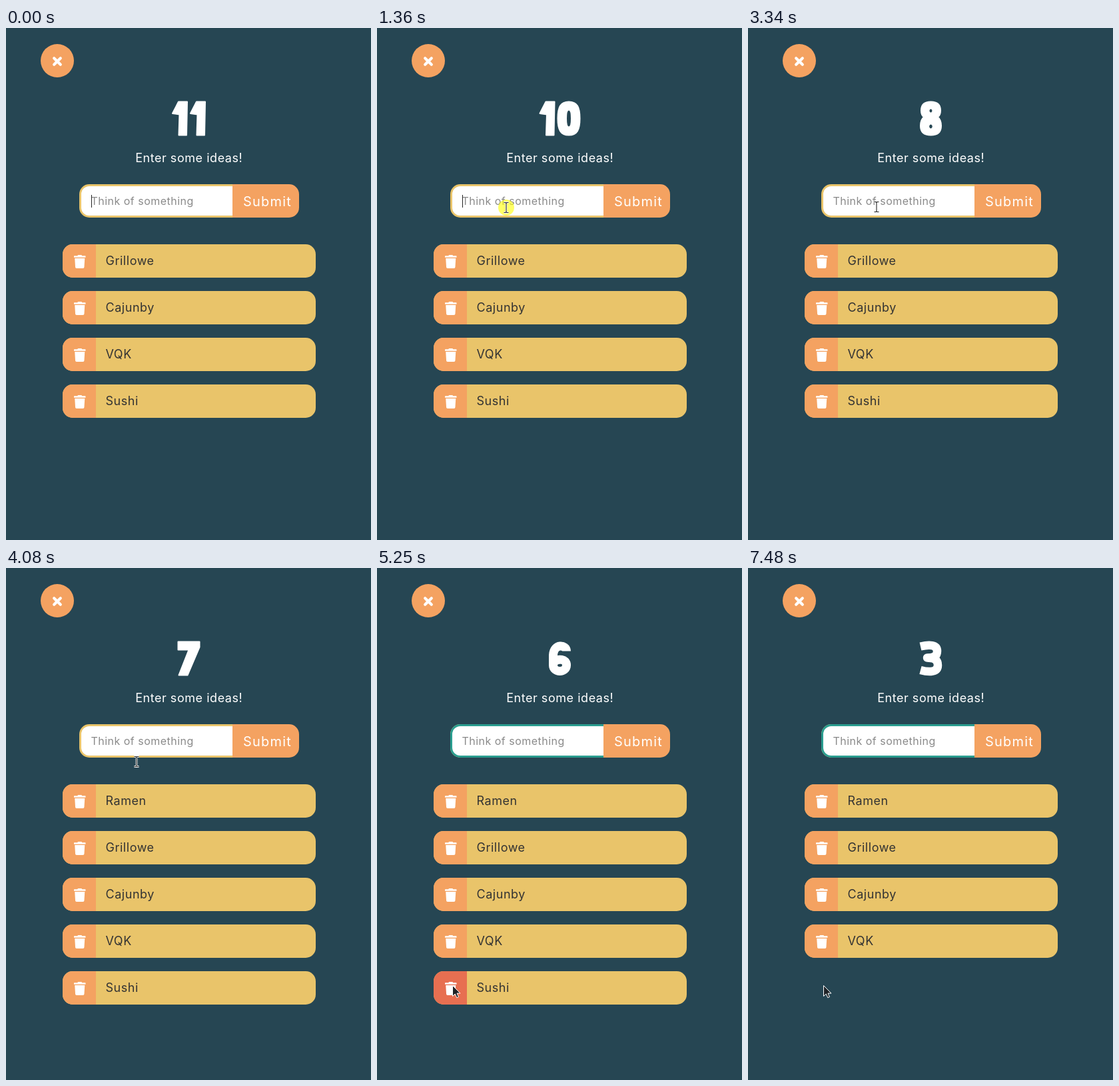
An HTML page that plays this animation: 548x767 px, repeating every 8000 ms.

```html
<!DOCTYPE html>
<html lang="en">
<head>
<meta charset="utf-8">
<title>Idea list</title>
<style>
  html, body { margin: 0; height: 100%; overflow: hidden; background: #264653; }
  svg { display: block; width: 100vw; height: 100vh; }
  text { font: 18px Inter, "Open Sans", sans-serif; letter-spacing: .03em; fill: #fff; }
  .row text { fill: #333; }
  .row rect { fill: #e9c46a; }
  .row .side { fill: #f4a261; }
  .row.hover .side { fill: #e76f51; }
  #field { font-size: 16px; }
  #submit { font-size: 20px; letter-spacing: .06em; }
</style>
</head>
<body>
<svg viewBox="0 0 548 767">
  <defs>
    <path id="frame" d="M340 234H125a15 15 0 0 0-15 15v20a15 15 0 0 0 15 15h215z"/>
    <path id="trash" transform="scale(.0391)" fill="#fff" d="M432 32H312l-9-19A24 24 0 0 0 281 0H167a24 24 0 0 0-22 13l-9 19H16A16 16 0 0 0 0 48v32a16 16 0 0 0 16 16h416a16 16 0 0 0 16-16V48a16 16 0 0 0-16-16zM53 467a48 48 0 0 0 48 45h246a48 48 0 0 0 48-45L416 128H32z"/>
    <path id="bar" fill="none" d="M-3.5-7.5h2.5l1 1 1-1h2.5M0-6.5v13M-3.5 7.5h2.5l1-1 1 1h2.5"/>
  </defs>
  <rect width="548" height="767" fill="#264653"/>
  <circle cx="77" cy="49" r="25" fill="#f4a261"/>
  <path d="M72.2 45.2l9.6 9.6m0-9.6l-9.6 9.6" stroke="#fff" stroke-width="4.2" stroke-linecap="round"/>
  <g id="count" stroke="#fff" stroke-linejoin="round" fill-rule="evenodd"></g>
  <text x="274.7" y="201" text-anchor="middle">Enter some ideas!</text>

  <use href="#frame" fill="#e9c46a"/>
  <use href="#frame" id="blur" fill="#2a9d8f"/>
  <path d="M340 237H125a12 12 0 0 0-12 12v20a12 12 0 0 0 12 12h215z" fill="#fff"/>
  <path d="M340 234h85a15 15 0 0 1 15 15v20a15 15 0 0 1-15 15h-85z" fill="#f4a261"/>
  <text id="field" x="127.5" y="265"></text>
  <rect id="caret" y="250" width="1" height="19" fill="#222"/>
  <text id="submit" x="356" y="267">Submit</text>

  <g id="rows"></g>

  <g id="pointer">
    <circle id="glow" r="12" fill="#ff0" fill-opacity=".6"/>
    <path id="arrow" d="M.5.5v16l3.8-3.4 2.5 5.6 2.7-1.2-2.5-5.4h5z" fill="#1f2327" stroke="#fff"/>
    <g id="beam">
      <use href="#bar" stroke="#fff" stroke-width="2.8"/>
      <use href="#bar" stroke="#222" stroke-width="1.1"/>
    </g>
  </g>
</svg>
<script>
const LOOP = 8000;
const $ = id => document.getElementById(id);
const show = (el, on) => { el.style.display = on ? '' : 'none'; };

// digit: [width, path, stroke width]; wide strokes are left unfilled
const DIGITS = [
  [35, 'M17.5 1C5 1 1 9 1 26s4 25 16.5 25S34 43 34 26 30 1 17.5 1zM17.5 13q4 0 4 13t-4 13-4-13 4-13z', 2],
  [24, 'M10 1H23L22 51H10.5L11.5 20 1 18.5z', 2],
  [],
  [33, 'M1 8C14 5 26 5 26 15c0 8-6 10-15 10 10 0 16 3 16 11 0 11-13 11-26 7.500', 12.5],
  [33, 'M14 1H29.500L28 30H32V41H28L27 51H15.500L16 41H1V32zM17 17L11.500 30H16.500z', 2],
  [33, 'M30 7H9L8 25c8-5 19-3 19 8 0 13-13 14-25 9', 12.5],
  [34, 'M27 15C27 5 8 3 7 21V36c0 12 20 12 20 0 0-10-13-10-18-5', 13],
  [34, 'M1 1H33V9L15 51H2L17 13H1z', 2],
  [33, 'M16.5 1C6 1 2 5 2 14q0 7 4 10Q1 28 1 37C1 47 6 51 16.500 51S32 47 32 37q0-9-5-13 4-3 4-10C31 5 27 1 16.500 1zM16.500 11a3 3.500 0 1 1-.1 0zM16.500 34a3.300 4 0 1 1-.1 0z', 2],
  [34, 'M7 37C7 47 26 49 27 31V16C27 4 7 4 7 16c0 10 13 10 18 5', 13]
];
const TICKS = [390, 1430, 2400, 3410, 4430, 5440, 6430, 7480];
const KEYS = [2150, 2220, 2360, 2540, 2740];
const CLEARED = 3010, ADDED = 3480, REMOVED = 5310;
const PATH = [
  [390, 468, 743], [1150, 194, 269], [1420, 194, 269], [1490, 193, 268],
  [4079, 193, 268], [4080, 196, 290], [4780, 137, 632], [4850, 113, 625]
];
const passed = (times, t) => times.filter(v => t >= v).length;

const rows = ['Ramen', 'Grillowe', 'Cajunby', 'VQK', 'Sushi'].map(name => {
  const g = document.createElementNS('http://www.w3.org/2000/svg', 'g');
  g.setAttribute('class', 'row');
  g.innerHTML = `<rect width="380" height="50" rx="15"/>
    <path class="side" d="M50 0H15A15 15 0 0 0 0 15V35A15 15 0 0 0 15 50H50z"/>
    <g transform="translate(17 16)"><use href="#trash"/></g>
    <text x="64.5" y="31">${name}</text>`;
  $('rows').append(g);
  return g;
});

let shown;
function drawCount(n) {
  if (n === shown) return;
  shown = n;
  const glyphs = [...String(n)].map(c => DIGITS[c]);
  const total = glyphs.reduce((sum, g) => sum + g[0] + 3, -3);
  let x = 274.5 - total / 2;
  $('count').innerHTML = glyphs.map(([w, d, sw]) => {
    const path = `<path transform="translate(${x} 109.500)" d="${d}" stroke-width="${sw}" fill="${sw > 2 ? 'none' : '#fff'}"/>`;
    x += w + 3;
    return path;
  }).join('');
}

function pointerAt(t) {
  const i = PATH.findIndex(p => p[0] > t);
  if (i < 0) return PATH[PATH.length - 1].slice(1);
  if (!i) return PATH[0].slice(1);
  const [t0, x0, y0] = PATH[i - 1], [t1, x1, y1] = PATH[i];
  const k = (t - t0) / (t1 - t0), e = k * k * (3 - 2 * k);
  return [x0 + (x1 - x0) * e, y0 + (y1 - y0) * e];
}

function drawField(t) {
  const typed = t < CLEARED ? 'Ramen'.slice(0, passed(KEYS, t)) : '';
  const field = $('field');
  field.textContent = typed || 'Think of something';
  field.style.fill = typed ? '#333' : '#8a8a8a';
  $('caret').setAttribute('x', 128 + (typed ? Math.round(field.getComputedTextLength()) : 0));
  show($('caret'), t < 700 || (t >= 1220 && t < 3340));
  $('blur').style.opacity = Math.min(1, Math.max(0, (t - 4850) / 210));
}

function draw(t) {
  drawCount(11 - passed(TICKS, t));
  drawField(t);

  const [x, y] = pointerAt(t);
  const inField = x > 110 && x < 340 && y > 234 && y < 300;
  show($('pointer'), t >= 390);
  $('pointer').setAttribute('transform', `translate(${x} ${y})`);
  show($('arrow'), !inField);
  show($('beam'), inField);
  show($('glow'), (t >= 1220 && t < 1490) || (t >= 4920 && t < 5250));

  rows.forEach((row, i) => {
    const top = 324 + 70 * (t < ADDED ? i - 1 : i);
    show(row, i === 0 ? t >= ADDED : i < 4 || t < REMOVED);
    row.setAttribute('transform', `translate(85 ${top})`);
    row.classList.toggle('hover', t >= 390 && x > 85 && x < 135 && y > top && y < top + 50);
  });
}

const start = performance.now();
(function tick() {
  draw((performance.now() - start) % LOOP);
  requestAnimationFrame(tick);
})();
</script>
</body>
</html>
```
